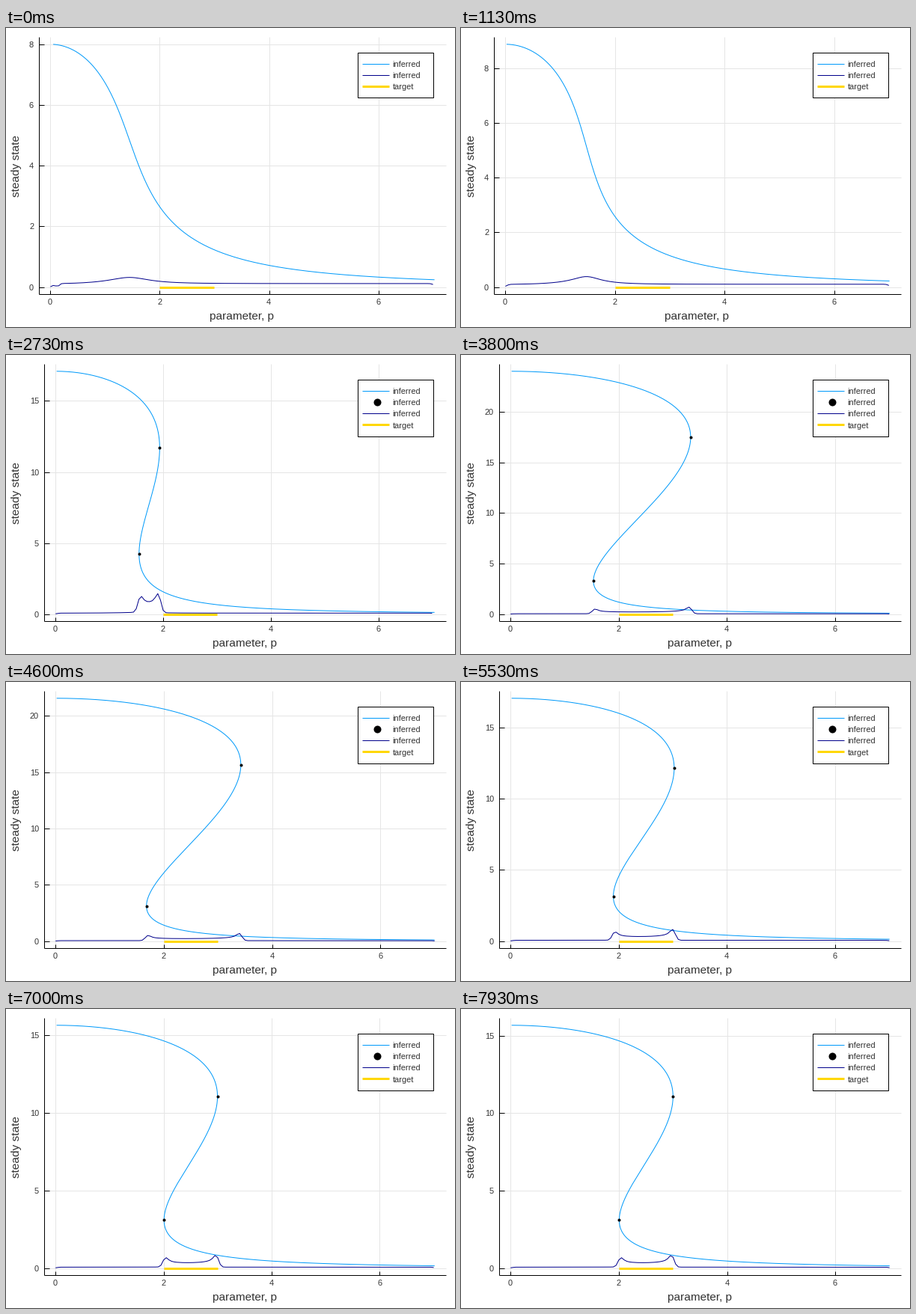
A matplotlib script that plays this animation: 600 by 400 pixels, repeating every 8000 ms.

```python
import numpy as np
import matplotlib.pyplot as plt
from matplotlib.animation import FuncAnimation
from matplotlib.patches import Rectangle

W, H, DPI = 600, 400, 100
FRAMES, LOOP = 120, 8000
TOP, BOTTOM, RIGHT = 12, 356.4, 588
BLUE, NAVY, GOLD, INK = "#009AFA", "#00008B", "#FFD700", "#333333"

# time (s), plateau height, feedback strength, repression, density scale, last p
KEYS = np.array([
    (0.000, 8.00, 1.203, 0.805, 0.1170, 7.027),
    (1.133, 9.00, 1.669, 0.900, 0.1040, 7.011),
    (2.733, 17.50, 8.615, 1.718, 0.0695, 7.046),
    (3.800, 24.00, 21.86, 2.311, 0.0403, 7.007),
    (5.533, 16.88, 12.82, 1.581, 0.0590, 7.007),
    (7.000, 15.65, 11.57, 1.457, 0.0625, 7.017),
    (7.933, 15.67, 11.60, 1.4585, 0.0625, 7.002),
])
KT, KV = KEYS[:, 0], np.log(KEYS[:, 1:])
STEP = np.diff(KT)[:, None]
RATE = np.diff(KV, axis=0) / STEP
SLOPE = np.zeros_like(KV)
SLOPE[1:-1] = (RATE[:-1] * STEP[1:] + RATE[1:] * STEP[:-1]) / (STEP[:-1] + STEP[1:])

GRID = np.linspace(0, 7, 141)
SAMPLES = np.linspace(0, 1, 4000) ** 1.5


def params(t):
    """Cubic Hermite interpolation of the log parameters."""
    i = int(np.clip(np.searchsorted(KT, t, side="right") - 1, 0, len(KT) - 2))
    h = KT[i + 1] - KT[i]
    s = min((t - KT[i]) / h, 1)
    smooth = s * s * (3 - 2 * s)
    bend = h * (SLOPE[i] * s * (1 - s) ** 2 - SLOPE[i + 1] * s * s * (1 - s))
    return np.exp(KV[i] + (KV[i + 1] - KV[i]) * smooth + bend)


def p_of(s, k, b):
    """Parameter at which the scaled steady state s is reached."""
    return np.sqrt(1 / s - 1) * (1 + k * s * s) / b


def branch(a, k, b, start, end):
    s = 1 / (1 + (SAMPLES * b * end) ** 2)
    p = p_of(s, k, b)
    keep = (p >= start) & (p <= end)
    return p[keep], a * s[keep]


def folds(a, k, b):
    if k <= 4:
        return None
    phi = np.arccos(1 - 8 / k) / 3
    s = 0.25 + 0.5 * np.cos(np.array([phi, phi - 2 * np.pi / 3]))
    return p_of(s, k, b), a * s


def density(p, u, scale, sigma=0.04):
    """Smoothed arc length per unit of p."""
    arc = np.hypot(np.diff(p), 0.5 * np.diff(u))
    mid = (p[1:] + p[:-1]) / 2
    kernel = np.exp(-0.5 * ((GRID[:, None] - mid) / sigma) ** 2)
    return scale * kernel @ arc / (sigma * np.sqrt(2 * np.pi))


def y_ticks(top):
    step = 2 if top < 10 else 2.5 if top < 15 else 5
    values = np.arange(0, top, step)
    return values, [f"{v:.1f}" if step == 2.5 else f"{v:.0f}" for v in values]


fig = plt.figure(figsize=(W / DPI, H / DPI), dpi=DPI, facecolor="white")
ax = fig.add_axes([0, 0, 1, 1])


def line(x, y, color, px=1.0, z=2, **kw):
    ax.plot(x, y, color=color, lw=px * 72 / DPI, zorder=z,
            solid_capstyle="butt", **kw)


def dots(x, y, radius, z=5):
    ax.plot(x, y, "o", color="black", ms=2 * radius * 72 / DPI, mew=0, zorder=z)


def label(x, y, s, px=11, **kw):
    ax.text(x, y, s, family="Liberation Sans", size=px * 72 / DPI,
            color=INK, zorder=9, **kw)


def legend(has_folds):
    rows = [("inferred", BLUE), ("inferred", NAVY), ("target", GOLD)]
    if has_folds:
        rows.insert(1, ("inferred", None))
    ax.add_patch(Rectangle((469.5, 32.5), 101, 15.2 * len(rows) + 15.2, fc="white",
                           ec="black", lw=72 / DPI, zorder=7))
    for i, (name, color) in enumerate(rows):
        y = 47.7 + 15.25 * i
        if color:
            line([475.5, 511.5], [y, y], color, 3 if color == GOLD else 1, z=8)
        else:
            dots([496.3], [y], 5, z=8)
        label(516.5, y + 4.2, name, va="baseline")


def draw(frame):
    ax.cla()
    ax.set(xlim=(0, W), ylim=(H, 0))
    ax.axis("off")

    t = frame * LOOP / FRAMES / 1000
    a, k, b, scale, end = params(t)
    early = np.exp(-t / 0.3)
    p, u = branch(a, k, b, 0.02 + 0.03 * early, end)

    values, names = y_ticks(1.03 * a)
    left = 44 + {1: 0, 2: 7, 4: 17}[max(map(len, names))]

    def px(v):
        return left + (RIGHT - left) * (v / end + 0.03) / 1.06

    def py(v):
        return BOTTOM - (BOTTOM - TOP) * (v / a + 0.03) / 1.06

    for v in (0, 2, 4, 6):
        x = px(v)
        line([x, x], [TOP, BOTTOM], "#e5e5e5", z=1)
        line([x, x], [BOTTOM - 5, BOTTOM], "black")
        label(x - 0.3, 370, str(v), ha="center", va="baseline")
    for v, name in zip(values, names):
        y = py(v)
        line([left, RIGHT], [y, y], "#e5e5e5", z=1)
        line([left, left + 7], [y, y], "black")
        label(left - 7, y + 4, name, ha="right", va="baseline")
    line([left, left], [TOP, BOTTOM], "black")
    line([left, RIGHT], [BOTTOM, BOTTOM], "black")

    line(px(p), py(u), BLUE, z=4)
    turning = folds(a, k, b)
    if turning:
        dots(px(turning[0]), py(turning[1]), 2)
    dens = density(p, u, scale)
    dens *= 1 - 0.65 * early * np.exp(-((GRID - 0.125) / 0.06) ** 4)
    line(px(GRID), py(dens), NAVY, z=5)
    line([px(2), px(3)], [py(0), py(0)], GOLD, 3, z=6)

    legend(turning is not None)
    label((left + RIGHT) / 2 - 1, 390, "parameter, p", 15.4,
          ha="center", va="baseline")
    label(21, 184.5, "steady state", 15.4, ha="right", va="center",
          rotation=90, rotation_mode="default")
    return []


anim = FuncAnimation(fig, draw, frames=FRAMES, init_func=lambda: [],
                     interval=LOOP / FRAMES, repeat=True, repeat_delay=0)
plt.show()
```
